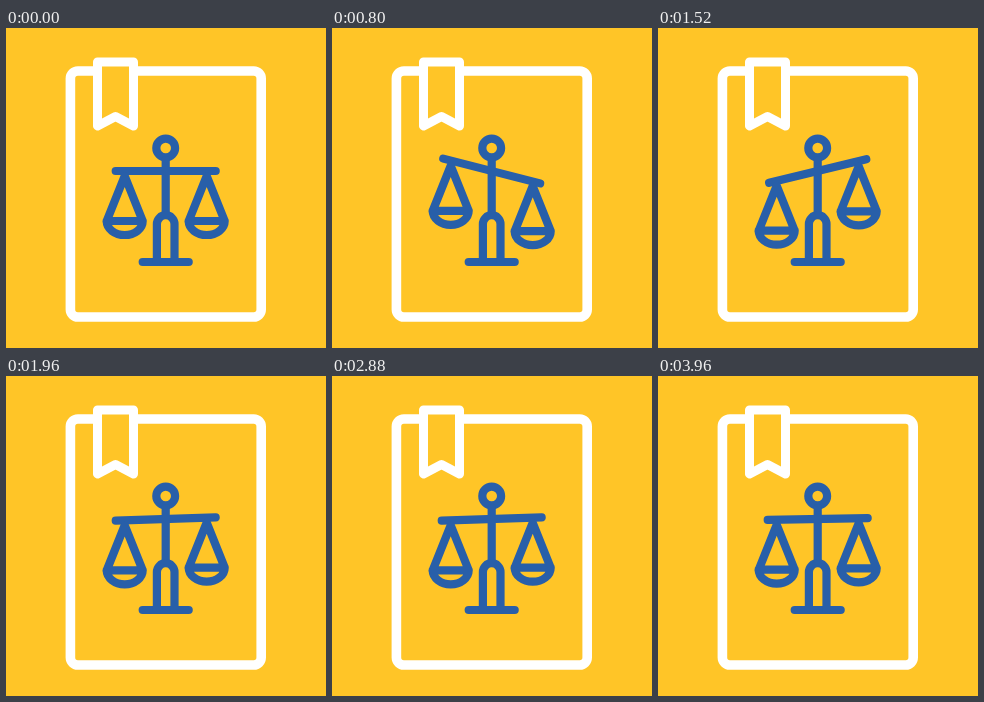
Animation of 320 by 320 pixels, one loop 4 s. Source, as an HTML page with a canvas:

```html
<!DOCTYPE html>
<html lang="en">
<head>
<meta charset="utf-8">
<title>Scales of justice</title>
<style>
  html, body { margin: 0; width: 100%; height: 100%; overflow: hidden; background: #ffc527; }
  canvas { display: block; width: 100vmin; height: 100vmin; }
</style>
</head>
<body>
<canvas id="stage"></canvas>
<script>
const SIZE = 320, LOOP = 4000, STEP = 40;
const YELLOW = '#ffc527', BLUE = '#285fa9', WHITE = '#fff';
const CX = 159.7, BEAM_Y = 143, ARM = 41;

// Swing of the beam: time in ms, angle in degrees, slope in degrees per ms
const SWING = [
  [0, 0, 0.0235],
  [730, 14.9, 0],
  [1560, -13.9, 0],
  [2440, 13.9, 0],
  [3270, -14.9, 0],
  [4000, 0, 0.0235]
];

const canvas = document.getElementById('stage');
const ctx = canvas.getContext('2d');

function swingAt(t) {
  let i = 0;
  while (i < SWING.length - 2 && t >= SWING[i + 1][0]) i++;
  const [t0, a, va] = SWING[i], [t1, b, vb] = SWING[i + 1];
  const span = t1 - t0, u = (t - t0) / span, w = 1 - u;
  const ease = u * u * (3 - 2 * u);
  const deg = a + (b - a) * ease + span * (va * u * w * w - vb * u * u * w);
  return deg * Math.PI / 180;
}

function pen(color, width) {
  ctx.strokeStyle = color;
  ctx.lineWidth = width;
  ctx.lineCap = ctx.lineJoin = 'round';
}

function line(x1, y1, x2, y2) {
  ctx.beginPath();
  ctx.moveTo(x1, y1);
  ctx.lineTo(x2, y2);
  ctx.stroke();
}

function drawBook() {
  pen(WHITE, 9.6);
  ctx.beginPath();
  ctx.roundRect(64.4, 43, 190.8, 246, 7.5);
  ctx.stroke();

  pen(WHITE, 9);
  ctx.fillStyle = YELLOW;
  ctx.beginPath();
  ctx.moveTo(91.5, 34);
  ctx.lineTo(127.5, 34);
  ctx.lineTo(127.5, 98);
  ctx.lineTo(109.5, 88.5);
  ctx.lineTo(91.5, 98);
  ctx.closePath();
  ctx.fill();
  ctx.stroke();
}

function drawStand() {
  ctx.beginPath();
  ctx.arc(CX, 120, 9.4, 0, Math.PI * 2);
  ctx.stroke();
  line(CX, 132, CX, 186);
  line(CX - 23, 234, CX + 23, 234);

  ctx.beginPath();
  ctx.moveTo(CX - 8.8, 234);
  ctx.lineTo(CX - 8.8, 196);
  ctx.arc(CX, 196, 8.8, Math.PI, 0);
  ctx.lineTo(CX + 8.8, 234);
  ctx.stroke();
}

function drawPan(x, dy) {
  const top = 148 + dy, rim = 193 + dy;
  ctx.beginPath();
  ctx.moveTo(x - 18, rim);
  ctx.lineTo(x, top);
  ctx.lineTo(x + 18, rim);
  ctx.ellipse(x, rim, 18, 14, 0, 0, Math.PI);
  ctx.lineTo(x + 18, rim);
  ctx.stroke();
}

function drawScales(angle) {
  pen(BLUE, 8.2);
  drawStand();
  const c = Math.cos(angle) * 50, s = Math.sin(angle) * 50;
  line(CX - c, BEAM_Y - s, CX + c, BEAM_Y + s);
  const drop = ARM * Math.sin(angle);
  drawPan(CX - ARM, -drop);
  drawPan(CX + ARM, drop);
}

function resize() {
  const px = Math.round(Math.min(innerWidth, innerHeight) * (devicePixelRatio || 1));
  if (canvas.width !== px) canvas.width = canvas.height = px;
  ctx.setTransform(px / SIZE, 0, 0, px / SIZE, 0, 0);
}

const start = performance.now();

function frame() {
  const elapsed = performance.now() - start;
  const t = Math.floor((elapsed % LOOP) / STEP) * STEP;
  resize();
  ctx.fillStyle = YELLOW;
  ctx.fillRect(0, 0, SIZE, SIZE);
  drawBook();
  drawScales(swingAt(t));
  requestAnimationFrame(frame);
}
frame();
</script>
</body>
</html>
```
